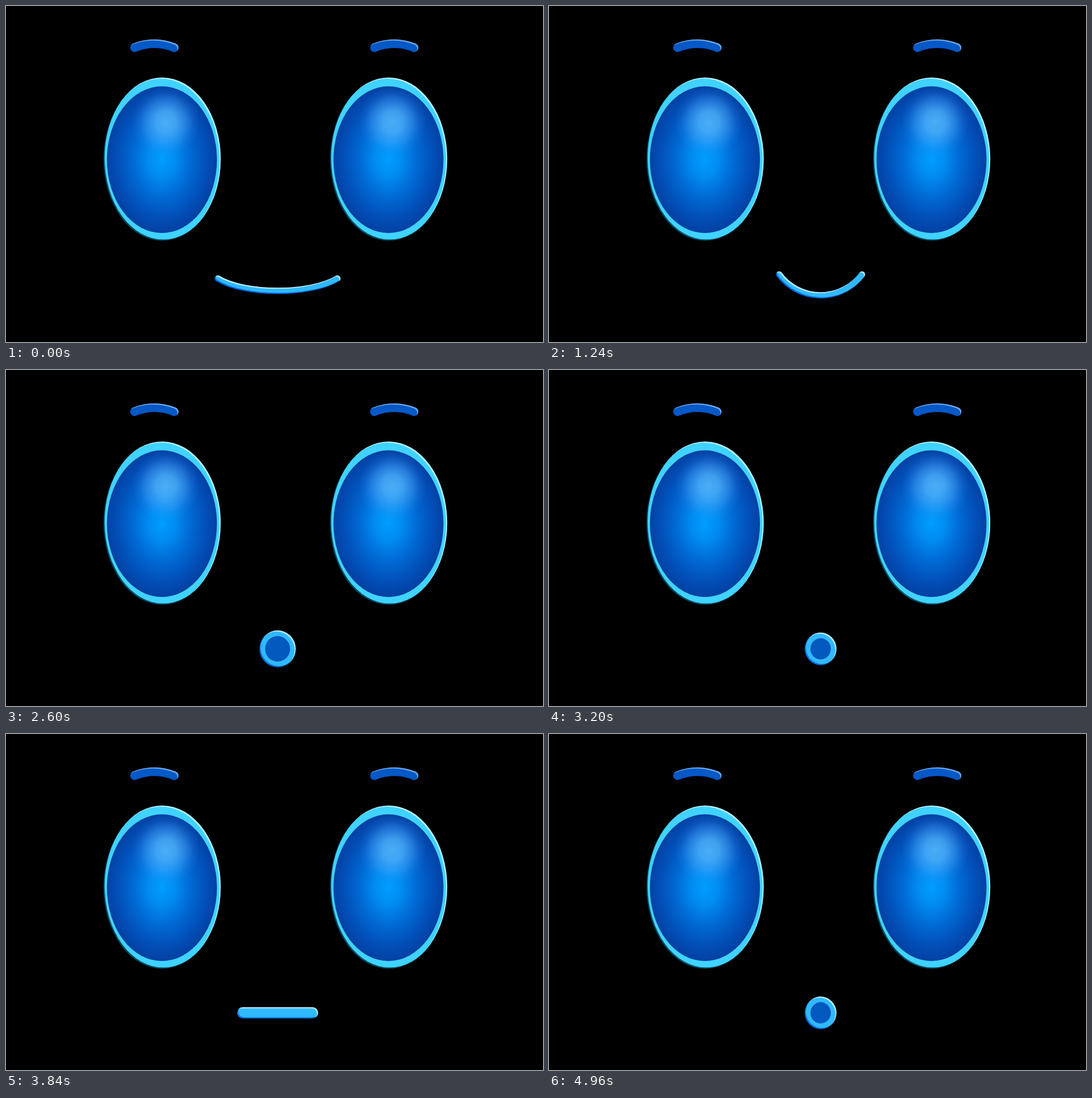
These frames come from a looping animation (947 by 592 pixels, 5000 ms). An HTML page:

```html
<!DOCTYPE html>
<html lang="en">
<head>
<meta charset="utf-8">
<title>Talking face</title>
<style>
  html, body { margin: 0; width: 100%; height: 100%; overflow: hidden; background: #000; }
  svg { display: block; }
</style>
</head>
<body>
<svg width="947" height="592" viewBox="0 0 947 592" fill="none" stroke-linecap="round">
  <defs id="defs">
    <radialGradient id="iris" gradientUnits="userSpaceOnUse" cx="0" cy="0" r="129" gradientTransform="scale(.76 1)">
      <stop offset="0" stop-color="#009eff"/>
      <stop offset=".25" stop-color="#008bf0"/>
      <stop offset=".5" stop-color="#006cd6"/>
      <stop offset=".8" stop-color="#024fb8"/>
      <stop offset="1" stop-color="#0341a3"/>
    </radialGradient>
    <radialGradient id="shine">
      <stop offset="0" stop-color="#5cbeff" stop-opacity=".8"/>
      <stop offset=".3" stop-color="#5abaff" stop-opacity=".7"/>
      <stop offset=".6" stop-color="#52aeff" stop-opacity=".4"/>
      <stop offset=".82" stop-color="#489fff" stop-opacity=".13"/>
      <stop offset="1" stop-color="#3f98f8" stop-opacity="0"/>
    </radialGradient>
    <g id="eye">
      <ellipse cx=".3" cy="-.3" rx="103.4" ry="143.8" fill="#40d3ff" filter="url(#eyeBevel)"/>
      <ellipse cy=".8" rx="97" ry="129.3" fill="url(#iris)"/>
      <ellipse cx="7" cy="-66" rx="60" ry="62" fill="url(#shine)"/>
    </g>
    <path id="brow" d="M-35 7A91 91 0 0 1 35 7" stroke="#0659c6" stroke-width="15.4" filter="url(#browBevel)"/>
  </defs>
  <g id="brows">
    <use href="#brow" x="261.6" y="66.4"/>
    <use href="#brow" x="684.6" y="66.4"/>
  </g>
  <use class="eye" href="#eye"/>
  <use class="eye" href="#eye"/>
  <g id="mouth" transform="translate(479 491.3)"></g>
</svg>
<script>
const LOOP = 5000;
const $ = id => document.getElementById(id);

// Soft light along the upper right edge, shade along the lower left one.
const bevel = (id, light, lightAlpha, shade, shadeAlpha) => `
  <filter id="${id}" filterUnits="userSpaceOnUse" x="-120" y="-160" width="240" height="320" color-interpolation-filters="sRGB">
    <feOffset in="SourceAlpha" dx="-1.8" dy="2.4" result="down"/>
    <feOffset in="SourceAlpha" dx="1.8" dy="-2.4" result="up"/>
    <feFlood flood-color="${light}" flood-opacity="${lightAlpha}"/>
    <feComposite operator="out" in2="down"/>
    <feGaussianBlur stdDeviation=".7" result="lit"/>
    <feFlood flood-color="${shade}" flood-opacity="${shadeAlpha}"/>
    <feComposite operator="out" in2="up"/>
    <feGaussianBlur stdDeviation=".7" result="dark"/>
    <feMerge result="edges"><feMergeNode in="SourceGraphic"/><feMergeNode in="dark"/><feMergeNode in="lit"/></feMerge>
    <feComposite in="edges" operator="in" in2="SourceAlpha"/>
  </filter>`;
$('defs').insertAdjacentHTML('beforeend',
  bevel('eyeBevel', '#c4f4ff', .9, '#003c50', .9) +
  bevel('browBevel', '#78b0ee', .9, '#0455cc', .7) +
  bevel('mouthBevel', '#c4f0ff', .9, '#0064e6', .9));

const line = (d, width) =>
  `<path d="${d}" stroke="#31b9ff" stroke-width="${width}" filter="url(#mouthBevel)"/>`;
const open = (rx, ry) => `
  <ellipse rx="${rx}" ry="${ry}" fill="#31b9ff" filter="url(#mouthBevel)"/>
  <ellipse rx="${rx - 10}" ry="${ry - 10}" fill="#0459be"/>`;

const mouths = {
  wide: line('M-105.5 -11.3C-58 17.8 58 17.8 105.5 -11.3', 11),
  smile: line('M-73 -18.3A91 91 0 0 0 73 -18.3', 11),
  flat: line('M-61.5 0H61.5', 20),
  small: open(28, 28.7),
  round: open(32, 32.5),
  tall: open(46, 37.5),
  huge: open(62, 47.5),
  broad: open(93, 30),
};
$('mouth').innerHTML = Object.entries(mouths)
  .map(([name, art]) => `<g id="${name}" display="none">${art}</g>`).join('');

const speech = [
  [0, 'wide'], [120, 'flat'], [240, 'huge'], [360, 'round'], [480, 'smile'], [600, 'small'],
  [680, 'tall'], [800, 'flat'], [880, 'broad'], [1000, 'round'], [1080, 'flat'],
  [1240, 'smile'], [1360, 'tall'], [1440, 'wide'], [1560, 'flat'], [1640, 'small'], [1760, 'round'],
  [1880, 'broad'], [2000, 'huge'], [2120, 'flat'], [2240, 'round'], [2320, 'flat'], [2400, 'small'],
  [2520, 'broad'], [2600, 'round'], [2720, 'flat'],
  [2880, 'wide'], [3000, 'tall'], [3080, 'flat'], [3200, 'small'], [3280, 'smile'], [3360, 'round'],
  [3440, 'huge'], [3560, 'flat'], [3640, 'round'], [3760, 'smile'], [3840, 'flat'], [3920, 'small'],
  [4040, 'tall'], [4120, 'flat'], [4240, 'round'], [4320, 'smile'], [4440, 'round'], [4520, 'flat'],
  [4640, 'tall'], [4720, 'flat'], [4840, 'smile'], [4960, 'small'],
];

const eyes = [...document.querySelectorAll('.eye')];
let shown;

function draw(time) {
  const name = speech.findLast(([start]) => start <= time)[1];
  if (name !== shown) {
    if (shown) $(shown).setAttribute('display', 'none');
    $(name).removeAttribute('display');
    shown = name;
  }
  const phase = Math.min(1, Math.max(0, (time - 3420) / 360));
  const blink = Math.sin(phase * Math.PI) ** 2;
  eyes.forEach((eye, i) => eye.setAttribute('transform',
    `translate(${275 + 399.5 * i} 270) scale(${1 + .015 * blink} ${1 - .9 * blink})`));
  $('brows').setAttribute('transform', `translate(0 ${-5 * blink})`);
}

const begin = performance.now();
function tick() {
  draw((performance.now() - begin) % LOOP);
  requestAnimationFrame(tick);
}
tick();
</script>
</body>
</html>
```
